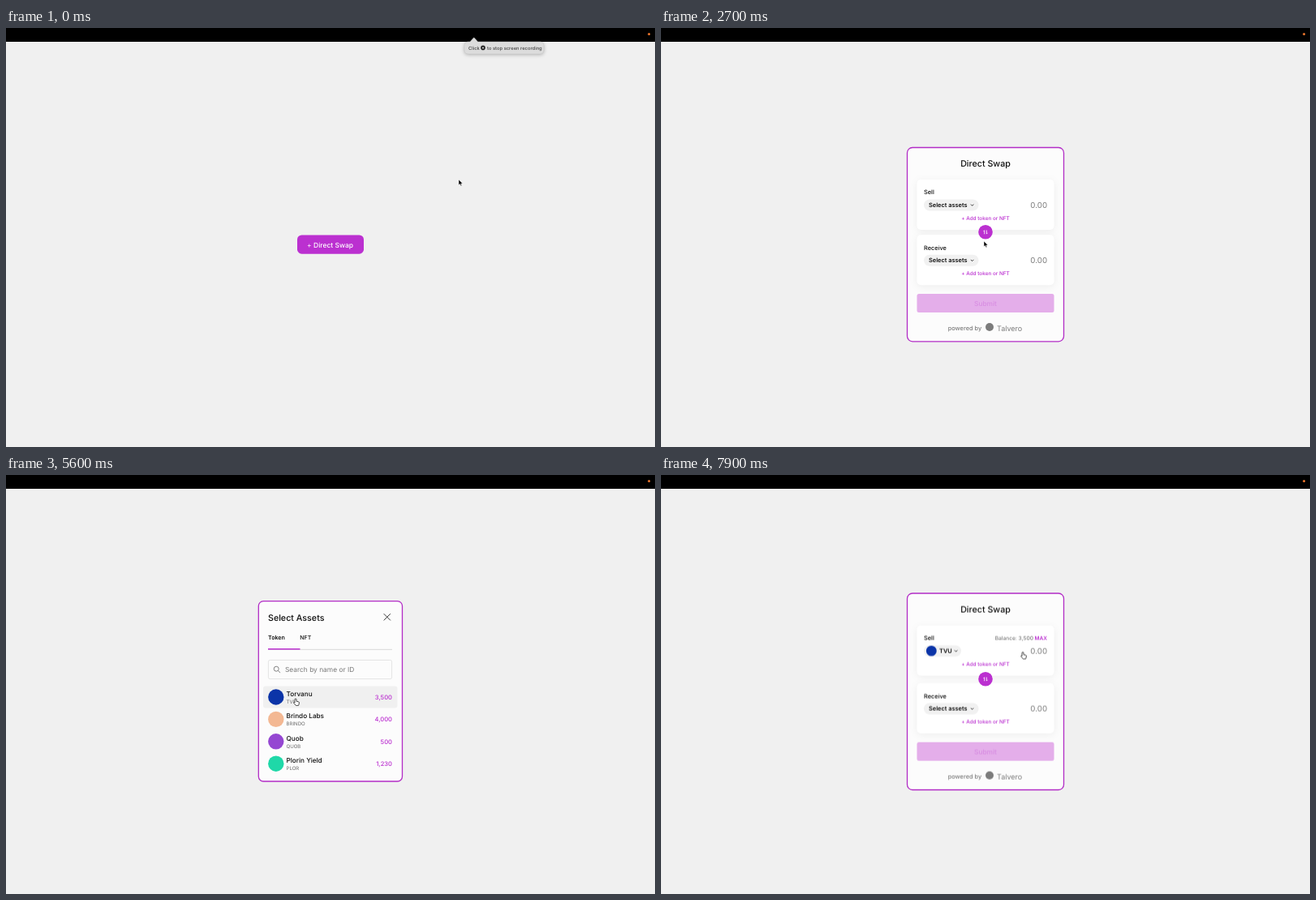
An HTML page that plays this animation: 800x517 px, repeating every 8000 ms.

```html
<!DOCTYPE html>
<html lang="en">
<head>
<meta charset="utf-8">
<title>Direct Swap</title>
<style>
  html, body { margin: 0; width: 100%; height: 100%; overflow: hidden; background: #f0f0f0; }
  svg { display: block; width: 100vw; height: 100vh; }
  text { font: 500 7.4px Inter, "Open Sans", sans-serif; fill: #111; text-rendering: geometricPrecision; white-space: pre; }

  .pink { fill: #bb30d0; }
  .dialog { fill: #fcfcfc; stroke: #b22cc6; stroke-width: 1.3; }
  .card { fill: #fff; filter: drop-shadow(0 2px 5px rgba(0, 0, 0, .06)); }
  .pill { fill: #f1f1f1; }
  .stroke { fill: none; stroke: #222; stroke-width: .9; }
  .mid { text-anchor: middle; }
  .end { text-anchor: end; }
  .title { font-size: 10.7px; }
  .bold { font-weight: 600; }
  .amount { font-size: 9.7px; font-weight: 400; fill: #7b7b7b; }
  .add { font-size: 6.4px; fill: #bb30d0; }
  .name { font-size: 8.2px; }
  .code { font-size: 6.1px; font-weight: 400; fill: #6c6c6c; }
  .value { font-size: 7.6px; fill: #bb30d0; text-anchor: end; }
  .gray { fill: #7c7c7c; }

  /* Scene switches: 1.25% of the loop is 100 ms */
  .launch, .main, .before, .after, .picker, .hover, .hand, .arrow, .upper, .lower {
    animation: 8s step-end infinite;
  }
  .launch { animation-name: launch; }
  .main { animation-name: main; }
  .before { animation-name: before; }
  .after { animation-name: after; }
  .picker { animation-name: picker; }
  .hover { animation-name: hover; }
  .hand { animation-name: hand; }
  .arrow { animation-name: arrow; }
  .upper { animation-name: upper; }
  .lower { animation-name: lower; }

  @keyframes launch { 0% { opacity: 1 } 23.75%, 100% { opacity: 0 } }
  @keyframes main { 0% { opacity: 0 } 23.75% { opacity: 1 } 45% { opacity: 0 } 73.75%, 100% { opacity: 1 } }
  @keyframes before { 0% { opacity: 1 } 73.75%, 100% { opacity: 0 } }
  @keyframes after { 0% { opacity: 0 } 73.75%, 100% { opacity: 1 } }
  @keyframes picker { 0% { opacity: 0 } 45% { opacity: 1 } 73.75%, 100% { opacity: 0 } }
  @keyframes hover { 0% { opacity: 0 } 67.5% { opacity: 1 } 73.75%, 100% { opacity: 0 } }
  @keyframes upper { 0% { transform: none } 73.75%, 100% { transform: translateY(-1.4px) } }
  @keyframes lower { 0% { transform: none } 73.75%, 100% { transform: translateY(1.6px) } }
  @keyframes hand {
    0% { opacity: 0 } 18.75% { opacity: 1 } 23.75% { opacity: 0 } 40% { opacity: 1 } 45% { opacity: 0 }
    67.5% { opacity: 1 } 73.75% { opacity: 0 } 95%, 100% { opacity: 1 }
  }
  @keyframes arrow {
    0% { opacity: 1 } 18.75% { opacity: 0 } 23.75% { opacity: 1 } 40% { opacity: 0 } 45% { opacity: 1 }
    67.5% { opacity: 0 } 73.75% { opacity: 1 } 95%, 100% { opacity: 0 }
  }

  /* The pointer advances ten times a second */
  .pointer { animation: pointer 8s step-end infinite; }
  @keyframes pointer {
    0% { transform: translate(558px, 187px) }
    7.5% { transform: translate(558px, 187px); animation-timing-function: steps(4) }
    12.5% { transform: translate(468px, 218px); animation-timing-function: steps(3) }
    16.25% { transform: translate(412px, 236px); animation-timing-function: steps(2) }
    18.75% { transform: translate(401px, 260px) }
    23.75% { transform: translate(400px, 262px); animation-timing-function: steps(8) }
    33.75% { transform: translate(398px, 263px); animation-timing-function: steps(6) }
    41.25% { transform: translate(382px, 217px) }
    42.5% { transform: translate(373px, 216.5px) }
    45% { transform: translate(373px, 216.5px); animation-timing-function: steps(8) }
    55% { transform: translate(375px, 236px); animation-timing-function: steps(9) }
    66.25% { transform: translate(364px, 256px); animation-timing-function: steps(3) }
    70% { transform: translate(357px, 276px) }
    73.75% { transform: translate(356.7px, 275px) }
    82.5% { transform: translate(356.7px, 275px); animation-timing-function: steps(5) }
    88.75% { transform: translate(368px, 261px); animation-timing-function: steps(4) }
    93.75% { transform: translate(400px, 238px); animation-timing-function: steps(4) }
    98.75%, 100% { transform: translate(446px, 218.5px) }
  }

  .tip { transform-origin: 565.6px 12px; animation: tip 8s step-end infinite; }
  @keyframes tip {
    0% { transform: none; opacity: 1 }
    11.25% { transform: none; opacity: 1; animation-timing-function: steps(4) }
    16.25% { transform: scale(.38, .26); opacity: .25 }
    17.5%, 100% { transform: scale(.38, .26); opacity: 0 }
  }
</style>
</head>
<body>
<svg viewBox="0 0 800 517">
  <defs>
    <path id="chevron" class="stroke" d="M-1.7-.8 0 .9 1.7-.8"/>
    <g id="card">
      <rect class="card" x="315.5" y="187" width="169" height="62" rx="5"/>
      <text class="amount end" x="476" y="222">0.00</text>
      <text class="add mid" x="400" y="236.8">+ Add token or NFT</text>
    </g>
    <g id="select">
      <rect class="pill" x="324" y="211.5" width="67.5" height="14" rx="7"/>
      <text class="bold" x="330" y="221">Select assets</text>
      <use href="#chevron" x="383.6" y="218.4"/>
    </g>
  </defs>

  <rect width="800" height="517" fill="#f0f0f0"/>
  <rect width="800" height="17" fill="#000"/>
  <circle cx="792.6" cy="7.5" r="1.5" fill="#e8742c"/>

  <g class="tip">
    <path d="M570 17h2l4-4.6q.8-.8 1.6 0l4 4.6H658q5 0 5 5v5q0 5-5 5H570q-5 0-5-5v-5q0-5 5-5Z"
      fill="#dcdcdc" stroke="#c4c4c4" stroke-width=".5" style="filter: drop-shadow(0 1px 2px rgba(0,0,0,.25))"/>
    <g style="font-size:5.8px">
      <text x="570" y="26.5" style="font-size:5.8px;fill:#444">Click</text>
      <circle cx="588" cy="24.4" r="2.8" fill="#222"/>
      <circle cx="588" cy="24.4" r="1" fill="#ddd"/>
      <text x="593" y="26.5" style="font-size:5.8px;fill:#444">to stop screen recording</text>
    </g>
  </g>

  <g class="launch">
    <rect class="pink" x="359" y="255.5" width="82" height="23.2" rx="5.5"/>
    <text x="371" y="270.5" style="font-size:8.5px;font-weight:400;fill:#fff">+</text>
    <text x="379" y="270.5" style="font-size:8.5px;fill:#fff">Direct Swap</text>
  </g>

  <g class="main">
    <rect class="dialog before" x="303.5" y="147.5" width="193" height="239.3" rx="6.5"/>
    <rect class="dialog after" x="303.5" y="146" width="193" height="242.5" rx="6.5"/>

    <g class="upper">
      <text class="title mid" x="400" y="171.2">Direct Swap</text>
      <use href="#card"/>
      <text x="324" y="205.4">Sell</text>
      <use class="before" href="#select"/>
      <g class="after">
        <rect class="pill" x="324" y="211.5" width="46" height="14" rx="7"/>
        <circle cx="333.3" cy="218.4" r="6.4" fill="#0b34a8"/>
        <text class="bold" x="343" y="221">TVU</text>
        <use href="#chevron" x="363.6" y="218.4"/>
        <text class="gray end" x="459" y="205.4" style="font-size:6.6px">Balance: 3,500</text>
        <text class="pink bold end" x="476" y="205.4" style="font-size:6.5px">MAX</text>
      </g>
    </g>

    <g class="lower">
      <use href="#card" y="68.3"/>
      <text x="324" y="273.8">Receive</text>
      <use href="#select" y="68.3"/>
      <rect x="315.5" y="328" width="169" height="23" rx="2.5" fill="#e4aeea"/>
      <text class="mid" x="400" y="342.6" style="font-size:8.3px;fill:#d88ee2">Submit</text>
      <text class="gray" x="353.7" y="372.8">powered by</text>
      <circle class="gray" cx="405" cy="369" r="5"/>
      <text class="gray" x="414" y="373.5" style="font-size:9px;font-weight:400">Talvero</text>
    </g>

    <circle class="pink" cx="400" cy="251.8" r="8.8"/>
    <path d="M398.7 254.3v-4.6l-1.2 1.3M401.3 249.5v4.6l1.2-1.3" fill="none" stroke="#fff" stroke-width=".8"/>
  </g>

  <g class="picker">
    <rect class="dialog" x="311.3" y="155.6" width="177.2" height="222.4" rx="6"/>
    <text class="title" x="323" y="179.6">Select Assets</text>
    <path class="stroke" d="M465.7 171.2l8.2 8.2m0-8.2-8.2 8.2"/>
    <text class="bold" x="323" y="203.2" style="font-size:7.1px">Token</text>
    <text x="362.3" y="203.2" style="font-size:7px">NFT</text>
    <path d="M323 215.3H476" stroke="#cfcfcf" stroke-width=".8"/>
    <path d="M323 214.8H362.5" stroke="#bb30d0" stroke-width="1.6"/>
    <rect x="323.4" y="228.4" width="152.2" height="23.2" rx="2" fill="#fcfcfc" stroke="#dedede" stroke-width=".8"/>
    <path d="M336.2 239.2a3 3 0 1 0-6 0a3 3 0 1 0 6 0M335.4 241.4l2.6 2.7" fill="none" stroke="#777" stroke-width=".9"/>
    <text x="344" y="243.3" style="font-size:8.4px;font-weight:400;fill:#7a7a7a">Search by name or ID</text>

    <rect class="hover" x="317" y="260.5" width="165.5" height="27" rx="3" fill="#f0f0f0"/>
    <g transform="translate(0 274)">
      <circle cx="332.8" r="9.7" fill="#0b34a8"/>
      <text class="name" x="345.5" y="-1.2">Torvanu</text>
      <text class="code" x="345.5" y="7.8">TVU</text>
      <text class="value" x="476" y="2.7">3,500</text>
    </g>
    <g transform="translate(0 301.4)">
      <circle cx="332.8" r="9.7" fill="#f3b893"/>
      <text class="name" x="345.5" y="-1.2">Brindo Labs</text>
      <text class="code" x="345.5" y="7.8">BRINDO</text>
      <text class="value" x="476" y="2.7">4,000</text>
    </g>
    <g transform="translate(0 328.8)">
      <circle cx="332.8" r="9.7" fill="#9547d2"/>
      <text class="name" x="345.5" y="-1.2">Quob</text>
      <text class="code" x="345.5" y="7.8">QUOB</text>
      <text class="value" x="476" y="2.7">500</text>
    </g>
    <g transform="translate(0 356.2)">
      <circle cx="332.8" r="9.7" fill="#1fd8a8"/>
      <text class="name" x="345.5" y="-1.2">Plorin Yield</text>
      <text class="code" x="345.5" y="7.8">PLOR</text>
      <text class="value" x="476" y="2.7">1,230</text>
    </g>
  </g>

  <g class="pointer">
    <path class="arrow" d="M0 0V6.8L1.6 5.4 2.6 7.7 3.8 7.2 2.8 4.9H5Z"
      fill="#000" stroke="#fff" stroke-width=".5"/>
    <path class="hand" d="M-1 1Q-1 0 0 0T1 1V3.2L3.6 3.8Q4.5 4 4.4 5L4 7.2 3.5 8.4H.3L-2.1 5.5Q-2.6 4.5-1.6 4.4L-1 5Z"
      fill="#fff" stroke="#222" stroke-width=".8"/>
  </g>
</svg>
</body>
</html>
```
